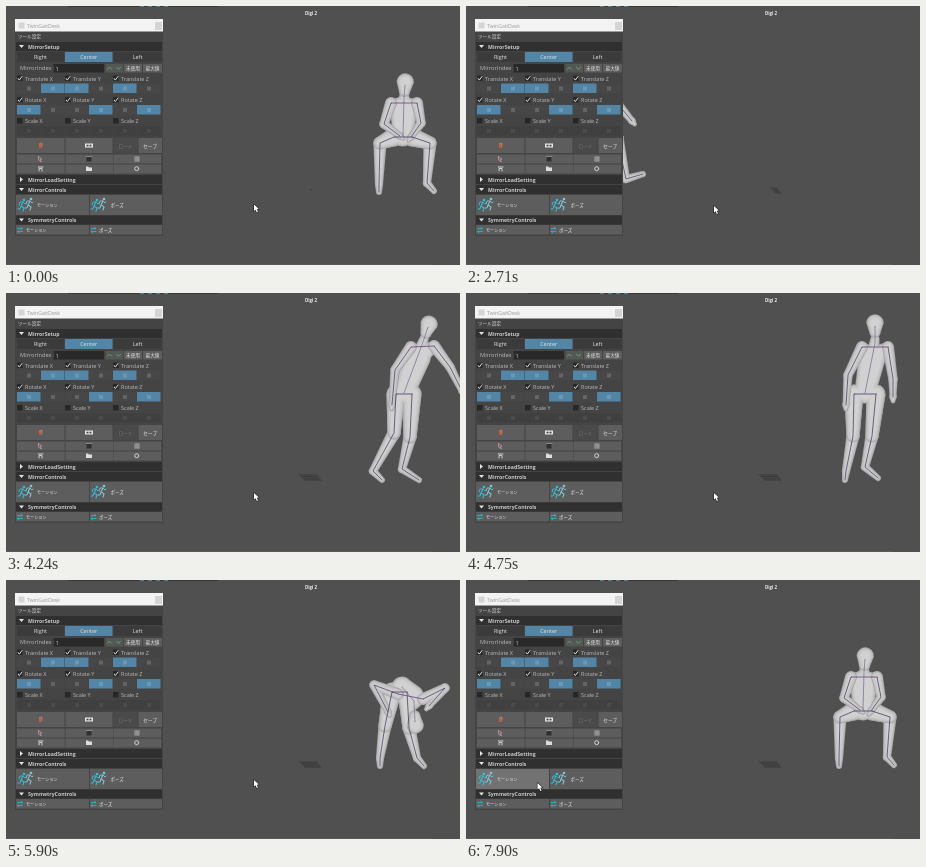
These frames come from a looping animation (454x259 px, 8 s). An HTML page with a canvas:

```html
<!DOCTYPE html>
<html lang="ja">
<meta charset="utf-8">
<style>
html, body { margin: 0; width: 100%; height: 100%; overflow: hidden; background: #505050 }
canvas { display: block }
</style>
<canvas id="stage" width="454" height="259"></canvas>
<script>
const ctx = document.getElementById('stage').getContext('2d');
const SANS = '"Open Sans", "Noto Sans CJK JP", "Noto Sans CJK", sans-serif';
const BLUE = '#5285a6', CYAN = '#2cc0d8';

function box(x, y, w, h, color) {
  ctx.fillStyle = color;
  ctx.fillRect(x, y, w, h);
}
function text(s, x, y, { size = 5.5, color = '#ccc', align = 'left', bold = false } = {}) {
  ctx.font = `${bold ? 'bold ' : ''}${size}px ${SANS}`;
  ctx.textAlign = align;
  ctx.textBaseline = 'alphabetic';
  ctx.fillStyle = color;
  ctx.fillText(s, x, y);
}
// pts is a flat x, y list
function line(pts, color, width = 1) {
  ctx.beginPath();
  for (let i = 0; i < pts.length; i += 2) ctx.lineTo(pts[i], pts[i + 1]);
  ctx.strokeStyle = color;
  ctx.lineWidth = width;
  ctx.lineCap = ctx.lineJoin = 'round';
  ctx.stroke();
}
function polygon(pts, color) {
  ctx.beginPath();
  for (let i = 0; i < pts.length; i += 2) ctx.lineTo(pts[i], pts[i + 1]);
  ctx.fillStyle = color;
  ctx.fill();
}
function ring(x, y, r, color) {
  ctx.beginPath();
  ctx.arc(x, y, r, 0, 7);
  ctx.strokeStyle = color;
  ctx.lineWidth = 0.9;
  ctx.stroke();
}

// ---- Poses: spine = head, neck, pelvis; arm = shoulder, elbow, hand; leg = hip, knee, ankle, toe
const sit = {
  spine: [399, 79, 398, 92, 397, 130],
  armL: [385, 97, 378, 118, 394, 130], armR: [411, 97, 415, 117, 405, 131],
  legL: [388, 131, 374, 137, 373, 178, 373, 186], legR: [406, 131, 424, 137, 421, 177, 428, 185]
};
const stride = {
  spine: [284, 33, 280, 50, 270, 98],
  armL: [272, 58, 262, 82, 259, 111], armR: [291, 60, 302, 94, 312, 118],
  legL: [266, 102, 266, 138, 239, 179, 252, 186], legR: [275, 101, 289, 136, 295, 176, 313, 171]
};
const turn = {
  spine: [422, 34, 417, 49, 398, 100],
  armL: [405, 54, 389, 77, 386, 112], armR: [428, 53, 444, 74, 456, 98],
  legL: [390, 101, 388, 140, 367, 178, 376, 187], legR: [406, 101, 404, 144, 396, 176, 413, 187]
};
const stand = {
  spine: [409, 33, 409, 50, 399, 100],
  armL: [396, 54, 382, 82, 380, 112], armR: [422, 54, 427, 86, 427, 104],
  legL: [388, 101, 387, 143, 380, 178, 379, 187], legR: [410, 101, 406, 143, 399, 174, 412, 185]
};
const bend = {
  spine: [409, 142, 408, 121, 396, 107],
  armL: [392, 114, 368, 105, 382, 132], armR: [417, 119, 439, 108, 423, 126],
  legL: [386, 112, 379, 146, 374, 178, 374, 186], legR: [401, 112, 403, 148, 411, 178, 418, 186]
};

const mapPose = (pose, fn) =>
  Object.fromEntries(Object.entries(pose).map(([part, v]) => [part, v.map((n, i) => fn(n, i, part))]));
const swap = p => ({ spine: p.spine, armL: p.armR, armR: p.armL, legL: p.legR, legR: p.legL });
const shift = (p, dx, squeeze = 1) =>
  mapPose(p, (n, i) => i % 2 ? n : 275 + (n - 275) * squeeze + dx);
const mix = (a, b, k) => mapPose(a, (n, i, part) => n + (b[part][i] - n) * k);

const enter = {
  ...shift(stride, -142),
  armR: [144, 58, 151, 97, 166, 115], legR: [131, 101, 151, 132, 160, 173, 177, 168]
};
const keys = [
  [2710, enter], [3030, shift(swap(stride), -71)], [3350, stride],
  [3850, shift(swap(stride), 72, 0.76)], [4240, turn], [4750, stand],
  [5320, stand], [5900, bend], [6480, sit], [8000, sit]
];
function poseAt(t) {
  if (t < 1800) return sit;
  if (t < 2710) return null;
  const i = keys.findIndex(([end]) => end > t);
  const [t0, a] = keys[i - 1], [t1, b] = keys[i];
  return mix(a, b, (t - t0) / (t1 - t0));
}

const bursts = [0, 2710, 2990, 3490, 4000, 4510, 5020, 5540, 6050, 6560, 7050, 7540];
function tick(t) {
  const start = bursts.filter(b => b <= t).pop();
  if (!start) return t;
  return start + Math.min(start === 2710 ? 1 : 3, Math.floor((t - start) / 120)) * 120;
}

// ---- Figure
function taper([x1, y1, r1, x2, y2, r2], inset, color) {
  r1 = Math.max(0.5, r1 - inset);
  r2 = Math.max(0.5, r2 - inset);
  const a = Math.atan2(y2 - y1, x2 - x1), q = Math.PI / 2;
  ctx.beginPath();
  ctx.arc(x1, y1, r1, a + q, a - q);
  ctx.arc(x2, y2, r2, a - q, a + q);
  ctx.closePath();
  ctx.fillStyle = color;
  ctx.fill();
}
function solid(parts) {
  for (const [inset, color] of [[0, '#a6a6a6'], [0.8, '#bcbcbc'], [2, '#c9c9c9'], [3.8, '#d1d1d1']])
    for (const part of parts) taper(part, inset, color);
}
function chain(pts, radii) {
  return radii.slice(1).map((r, i) =>
    [pts[2 * i], pts[2 * i + 1], radii[i], pts[2 * i + 2], pts[2 * i + 3], r]);
}
function figure({ spine, armL, armR, legL, legR }) {
  const [hx, hy, nx, ny, px, py] = spine;
  const len = Math.hypot(hx - nx, hy - ny) || 1, ux = (hx - nx) / len, uy = (hy - ny) / len;
  const cx = nx + (px - nx) * 0.3, cy = ny + (py - ny) * 0.3;
  const thighs = [legL, legR].map(leg => chain(leg, [9.5, 6.6, 4.1, 3]));
  thighs.forEach(solid);
  solid([
    ...thighs.map(([thigh]) => thigh),
    [armL[0], armL[1], 5.5, cx, cy, 11],
    [armR[0], armR[1], 5.5, cx, cy, 11],
    [cx, cy, 13.5, px, py, 10.5],
    [cx, cy, 7, nx + ux * 4, ny + uy * 4, 4.6]
  ]);
  for (const arm of [armL, armR]) {
    const [, , ex, ey, x, y] = arm;
    const reach = Math.hypot(x - ex, y - ey) || 1;
    solid([...chain(arm, [6, 4.7, 3.4]),
      [x, y, 3.9, x + (x - ex) / reach * 4, y + (y - ey) / reach * 4, 2.4]]);
  }
  solid([[hx + ux * 3, hy + uy * 3, 8.7, hx - ux * 6, hy - uy * 6, 5.8]]);
  for (const limb of [legL, legR, armL, armR]) line(limb, '#3b3050', 0.7);
  line([...armL.slice(0, 2), ...armR.slice(0, 2)], '#664080', 0.8);
  line([...legL.slice(0, 2), ...legR.slice(0, 2)], '#4b3568', 0.8);
  line(spine, '#66567c', 0.6);
}

// ---- Tool panel
function header(label, y, open = true) {
  box(10, y, 146, 9, '#303030');
  polygon(open ? [13, y + 3, 18, y + 3, 15.5, y + 6] : [14, y + 2, 17, y + 4.5, 14, y + 7], '#e4e4e4');
  text(label, 22, y + 6.7, { size: 5.2, bold: true, color: '#ccc' });
}
function button(x, y, w, h, label, fill = '#5d5d5d', color = '#e4e4e4') {
  box(x, y, w, h, fill);
  if (label) text(label, x + w / 2, y + h / 2 + 2, { size: label.charCodeAt(0) > 255 ? 4.6 : 5.5, align: 'center', color });
}
function axisRow(name, y, picks) {
  ['X', 'Y', 'Z'].forEach((axis, i) => {
    const x = 11 + i * 48, on = picks[i] >= 0;
    box(x, y, 5.5, 5.5, '#272727');
    if (on) line([x + 1, y + 3, x + 2.3, y + 4.6, x + 5, y + 1], '#eee', 0.9);
    text(`${name} ${axis}`, x + 8, y + 5, { color: '#bbb' });
    for (const side of [0, 1]) {
      const active = picks[i] === side, bx = x + side * 24;
      box(bx, y + 8, 23.5, 9.5, active ? BLUE : on ? '#474747' : '#404040');
      box(bx + 10, y + 11, 4, 4, active ? '#6d98b2' : on ? '#646464' : '#4b4b4b');
    }
  });
}
function runner(x, y, color) {
  ctx.beginPath();
  ctx.arc(x + 2, y - 5, 1.3, 0, 7);
  ctx.fillStyle = color;
  ctx.fill();
  line([x + 1, y - 3, x - 1, y + 1, x + 2, y + 3, x + 1, y + 6], color, 1.1);
  line([x - 1, y + 1, x - 2, y + 4, x - 4, y + 4], color, 1);
  line([x - 3, y, x - 2, y - 3, x + 1, y - 3, x + 3, y - 1, x + 4, y - 2], color, 0.9);
}
function swapArrows(x, y) {
  line([x, y - 1.3, x + 5, y - 1.3, x + 3.5, y - 2.8], CYAN, 0.9);
  line([x + 5, y + 1.3, x, y + 1.3, x + 1.5, y + 2.8], CYAN, 0.9);
}
function toolIcons() {
  box(33, 138, 3, 4, '#b5603f');
  line([33, 138, 36, 137, 36, 140], '#d08560', 0.8);
  box(79, 137.5, 8, 4, '#e8e8e8');
  box(80.5, 138.7, 2, 1.7, '#444');
  box(83.5, 138.7, 2, 1.7, '#444');
  line([32.5, 150.5, 36, 153, 34, 153.5, 35.5, 156, 32.5, 154, 32.5, 150.5], '#d0a0a4', 0.7);
  box(80.5, 151, 5, 4.5, '#303030');
  line([80, 150.5, 86, 150.5], '#999', 0.7);
  box(128.5, 150.5, 5, 5, '#aaa');
  line([129, 152, 133, 152], '#555', 0.6);
  line([129, 154, 133, 154], '#555', 0.6);
  line([32, 161, 37, 161], '#ddd', 0.9);
  line([33, 165, 33, 162.5, 36, 162.5, 36, 165], '#ddd', 0.9);
  polygon([80, 160.5, 82, 160.5, 83, 161.5, 86, 161.5, 86, 165, 80, 165], '#ddd');
  ring(130.7, 162.7, 2, '#ddd');
}
function panel(hover) {
  box(9, 13, 148, 217, '#444');
  box(9, 13, 148, 12.5, '#f3f3f3');
  box(12.5, 16.5, 6, 6, '#d5d5d5');
  text('TwinGaitDesk', 21, 21.5, { size: 5.2, color: '#999' });
  box(149, 16, 7, 8, '#d4d4d4');
  text('ツール設定', 12, 32, { size: 4.6, color: '#ddd' });
  header('MirrorSetup', 36);
  button(11, 46, 47, 10, 'Right', '#3b3b3b');
  button(59, 46, 47.5, 10, 'Center', BLUE);
  button(107.5, 46, 48, 10, 'Left', '#3b3b3b');
  text('MirrorIndex : ', 14, 64, { size: 5.7, color: '#bbb' });
  box(47.5, 58, 50.5, 8.5, '#292929');
  text('1', 49.5, 64.5);
  box(99.5, 58, 17.5, 8.5, '#565656');
  line([101.5, 63.2, 103.5, 61, 105.5, 63.2], '#4cb573', 0.9);
  line([110.5, 61.2, 112.5, 63.4, 114.5, 61.2], '#4cb573', 0.9);
  button(118, 58, 18, 8.5, '未使用');
  button(137, 58, 19, 8.5, '最大値');
  axisRow('Translate', 69.5, [1, 0, 0]);
  axisRow('Rotate', 91, [0, 1, 1]);
  axisRow('Scale', 112, [-1, -1, -1]);
  button(11, 132, 47.5, 15);
  button(59.5, 132, 47, 15);
  button(107.5, 132, 24, 15, 'ロード', '#4a4a4a', '#777');
  button(132.5, 132, 23.5, 15, 'セーブ');
  for (const y of [148.5, 158.5])
    for (const x of [11, 59.5, 107.5]) button(x, y, 47.7, 9);
  toolIcons();
  header('MirrorLoadSetting', 169, false);
  header('MirrorControls', 179);
  button(10, 189, 73, 20, '', hover ? '#727272' : '#5d5d5d');
  button(84, 189, 72, 20);
  for (const x of [16, 89]) {
    runner(x, 199, CYAN);
    runner(x + 7, 198, '#7fc4d2');
  }
  text('モーション', 31, 200.7, { size: 4.1, color: '#eee' });
  text('ポーズ', 104.5, 200.7, { size: 4.4, color: '#eee' });
  header('SymmetryControls', 209.5);
  button(10, 219, 73, 9.5);
  button(84, 219, 72, 9.5);
  swapArrows(11.5, 224);
  swapArrows(85, 224);
  text('モーション', 20, 225.7, { size: 4.1, color: '#eee' });
  text('ポーズ', 93, 225.7, { size: 4.4, color: '#eee' });
}

function cursorAt(t) {
  if (t < 7540) return [248, t < 240 ? 198.5 : 200];
  const k = Math.min(1, (t - 7420) / 480), j = 1 - k;
  const curve = (a, b, c) => j * j * a + 2 * j * k * b + k * k * c;
  return [curve(248, 140, 71.5), curve(200, 222, 203)];
}
function cursor(x, y) {
  const pts = [0, 0, 0, 6.5, 1.6, 5.2, 2.8, 8, 4, 7.4, 2.8, 4.8, 4.8, 4.6, 0, 0]
    .map((n, i) => n + (i % 2 ? y : x));
  line(pts, '#222', 1.2);
  polygon(pts, '#fff');
}
function floorMark(t) {
  if (t < 1800) return box(304.5, 183.5, 1, 1, '#333');
  const left = t < 2990 ? 303 : 292;
  polygon([left, 181, 311, 181, 316, 188, left + 7, 188], '#444');
  line([left + 3, 183.5, 311, 183.5], '#3a3a3a', 0.7);
  line([left + 6, 186, 313, 186], '#3a3a3a', 0.7);
}

function draw(now) {
  const t = now % 8000, step = tick(t);
  box(0, 0, 454, 259, '#505050');
  box(62, 0, 150, 1, '#393939');
  for (let x = 134; x < 160; x += 8) box(x, 0, 4, 1, '#4f7d92');
  box(0, 258, 426, 1, '#5a5a5a');
  text('Digi 2', 299, 9, { size: 4.4, bold: true, color: '#eee' });
  floorMark(t);
  const pose = poseAt(step);
  if (pose) figure(pose);
  const [x, y] = cursorAt(step);
  panel(x > 10 && x < 83 && y > 189 && y < 209);
  cursor(x, y);
}
let began;
function loop(now) {
  began ??= now;
  draw(now - began);
  requestAnimationFrame(loop);
}
requestAnimationFrame(loop);
</script>
</html>
```
